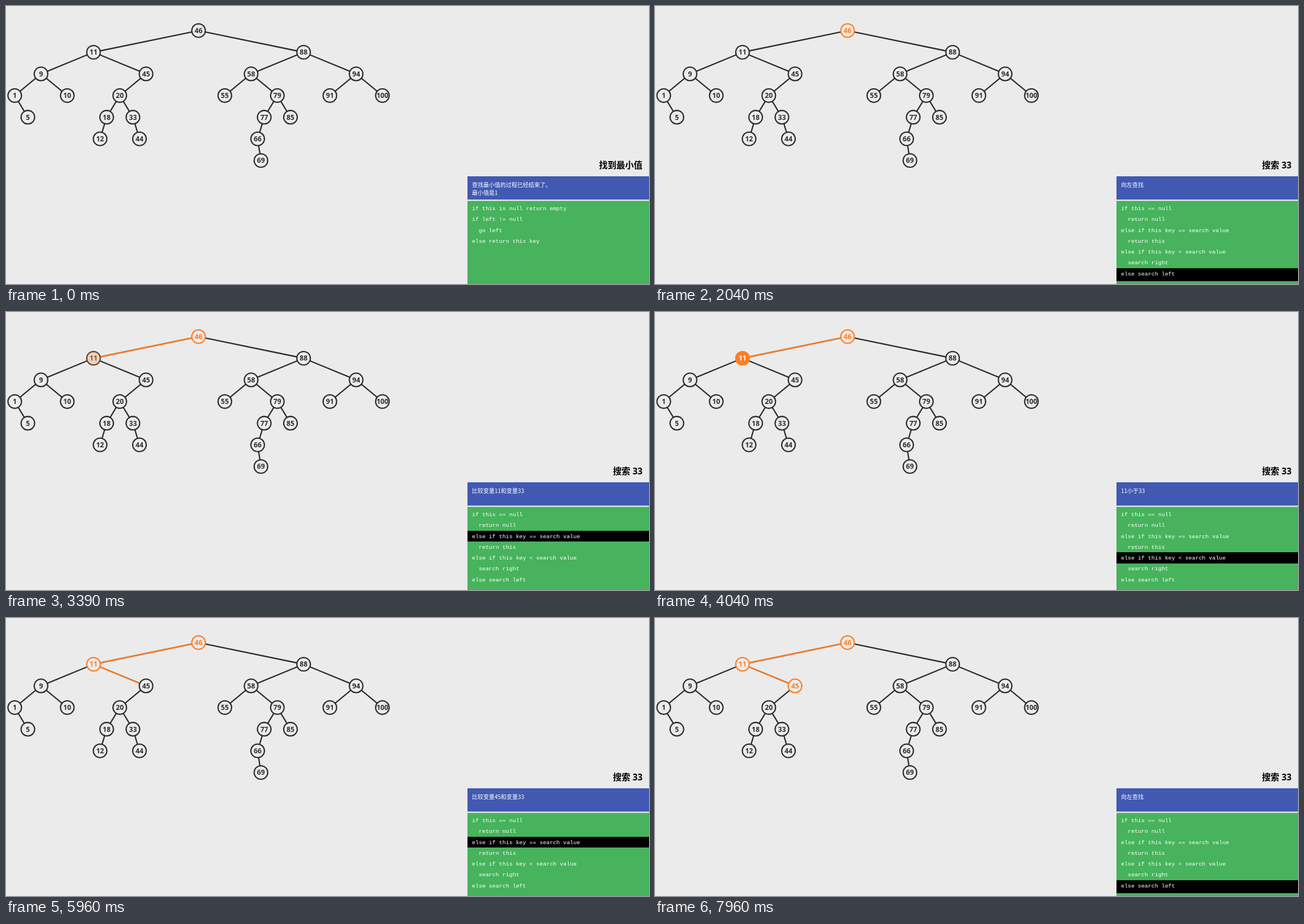
An HTML page with a canvas for the animation above (8000 ms loop, 1137 by 493 pixels).

```html
<!DOCTYPE html>
<html lang="zh">
<head>
<meta charset="utf-8">
<title>Binary search tree</title>
<style>
  html, body { margin: 0; width: 100%; height: 100%; overflow: hidden; background: #ebebeb; }
  canvas { display: block; width: 1137px; height: 493px; }
</style>
</head>
<body>
<canvas id="stage" width="1137" height="493"></canvas>
<script>
const ctx = document.getElementById('stage').getContext('2d');
const W = 1137, H = 493, LOOP = 8000, START = 58, STEP = 981;

const BG = [235, 235, 235], INK = [45, 45, 45], ORANGE = [254, 126, 35], WHITE = [255, 255, 255];
const BLUE = '#4159b2', GREEN = '#47b35c';
const PANEL_X = 816, TEXT_X = 824, ROW_TOP = 349.4, ROW_H = 19.25;

const CJK = '"Noto Sans CJK SC", "Noto Sans CJK", sans-serif';
const TITLE_FONT = 'bold 15.4px "Open Sans", ' + CJK;
const STATUS_FONT = '500 10px ' + CJK;
const CODE_FONT = '9.96px "Liberation Mono", monospace';
const NODE_FONT = 'bold 12.2px "Open Sans", "Noto Sans", sans-serif';

const PLAIN = { fill: BG, ring: INK, text: INK };
const ACTIVE = { fill: ORANGE, ring: ORANGE, text: WHITE };
const VISITED = { fill: BG, ring: ORANGE, text: ORANGE };

const MIN_CODE = [
  'if this is null return empty',
  'if left != null',
  '  go left',
  'else return this key'
];
const SEARCH_CODE = [
  'if this == null',
  '  return null',
  'else if this key == search value',
  '  return this',
  'else if this key < search value',
  '  search right',
  'else search left'
];

const TARGET = 33;
const PATH = [46, 11, 45, 20];
const KEYS = [46, 11, 88, 9, 45, 58, 94, 1, 10, 20, 55, 79, 91, 100,
  5, 18, 33, 77, 85, 12, 44, 66, 69];

// Each level halves the horizontal offset from the parent.
const nodes = new Map();
function insert(key) {
  let parent = null, x = 340.5, level = 0, at = nodes.get(KEYS[0]);
  while (at) {
    parent = at;
    level++;
    x = at.x + (key < at.key ? -1 : 1) * 371.5 / 2 ** level;
    at = key < at.key ? at.left : at.right;
  }
  const node = { key, parent, x, y: 43.6 + 38.4 * level };
  if (parent) parent[key < parent.key ? 'left' : 'right'] = node;
  nodes.set(key, node);
}
KEYS.forEach(insert);

const ease = u => u < 0.5 ? 4 * u ** 3 : 1 - 4 * (1 - u) ** 3;
const rgb = c => 'rgb(' + c.map(Math.round).join(',') + ')';
const mix = (a, b, k) => rgb(a.map((v, i) => v + (b[i] - v) * k));

function styleAt(key, step) {
  const first = PATH.indexOf(key) * 3;
  if (first < 0 || step < first) return PLAIN;
  return step === first ? ACTIVE : VISITED;
}

function drawLine(a, b, k, color) {
  ctx.strokeStyle = rgb(color);
  ctx.beginPath();
  ctx.moveTo(a.x, a.y);
  ctx.lineTo(a.x + (b.x - a.x) * k, a.y + (b.y - a.y) * k);
  ctx.stroke();
}

function drawEdge(node, step, k) {
  drawLine(node.parent, node, 1, INK);
  const i = PATH.indexOf(node.key);
  const grow = i * 3 - 1;
  if (i > 0 && step >= grow) drawLine(node.parent, node, step > grow ? 1 : k, ORANGE);
}

function disc(node, radius, color) {
  ctx.fillStyle = color;
  ctx.beginPath();
  ctx.arc(node.x, node.y, radius, 0, Math.PI * 2);
  ctx.fill();
}

function drawNode(node, step, k) {
  const from = styleAt(node.key, step - 1), to = styleAt(node.key, step);
  disc(node, 13.1, mix(from.ring, to.ring, k));
  disc(node, 10.8, mix(from.fill, to.fill, k));
  ctx.fillStyle = mix(from.text, to.text, k);
  ctx.fillText(node.key, node.x, node.y + 4.4);
}

function sceneAt(step) {
  if (step < 0) {
    return {
      title: '找到最小值', code: MIN_CODE, row: 0,
      status: ['查找最小值的过程已经结束了。', '最小值是1']
    };
  }
  const key = PATH[Math.floor(step / 3)];
  const less = key < TARGET;
  const [text, row] = [
    [`比较变量${key}和变量${TARGET}`, 3],
    [`${key}${less ? '小于' : '大于'}${TARGET}`, less ? 5 : 7],
    [less ? '向右查找' : '向左查找', less ? 6 : 7]
  ][step % 3];
  return { title: '搜索 ' + TARGET, code: SEARCH_CODE, row, status: [text] };
}

function drawPanel({ title, status, code, row }) {
  ctx.fillStyle = '#000';
  ctx.font = TITLE_FONT;
  ctx.textAlign = 'right';
  ctx.fillText(title, 1125.5, 288);

  ctx.fillStyle = BLUE;
  ctx.fillRect(PANEL_X, 302, W - PANEL_X, 41.3);
  ctx.fillStyle = GREEN;
  ctx.fillRect(PANEL_X, 345.6, W - PANEL_X, H - 345.6);
  if (row) {
    const top = Math.round(ROW_TOP + ROW_H * (row - 1) - 0.4);
    const bottom = row === code.length ? 488 : Math.round(ROW_TOP + ROW_H * row - 0.1);
    ctx.fillStyle = '#000';
    ctx.fillRect(PANEL_X, top, W - PANEL_X, bottom - top);
  }

  ctx.fillStyle = '#fff';
  ctx.textAlign = 'left';
  ctx.font = STATUS_FONT;
  status.forEach((line, i) => ctx.fillText(line, TEXT_X, 320.5 + 14.5 * i));
  ctx.font = CODE_FONT;
  code.forEach((line, i) => ctx.fillText(line, TEXT_X, 362 + ROW_H * i));
}

function draw(t) {
  const step = Math.floor((t - START) / STEP);
  const k = step < 0 ? 1 : ease((t - START) / STEP - step);
  ctx.fillStyle = rgb(BG);
  ctx.fillRect(0, 0, W, H);
  ctx.lineWidth = 2.3;
  nodes.forEach(n => n.parent && drawEdge(n, step, k));
  ctx.font = NODE_FONT;
  ctx.textAlign = 'center';
  nodes.forEach(n => drawNode(n, step, k));
  drawPanel(sceneAt(step));
}

const origin = performance.now();
function tick() {
  draw((performance.now() - origin) % LOOP);
  requestAnimationFrame(tick);
}
tick();
</script>
</body>
</html>
```
